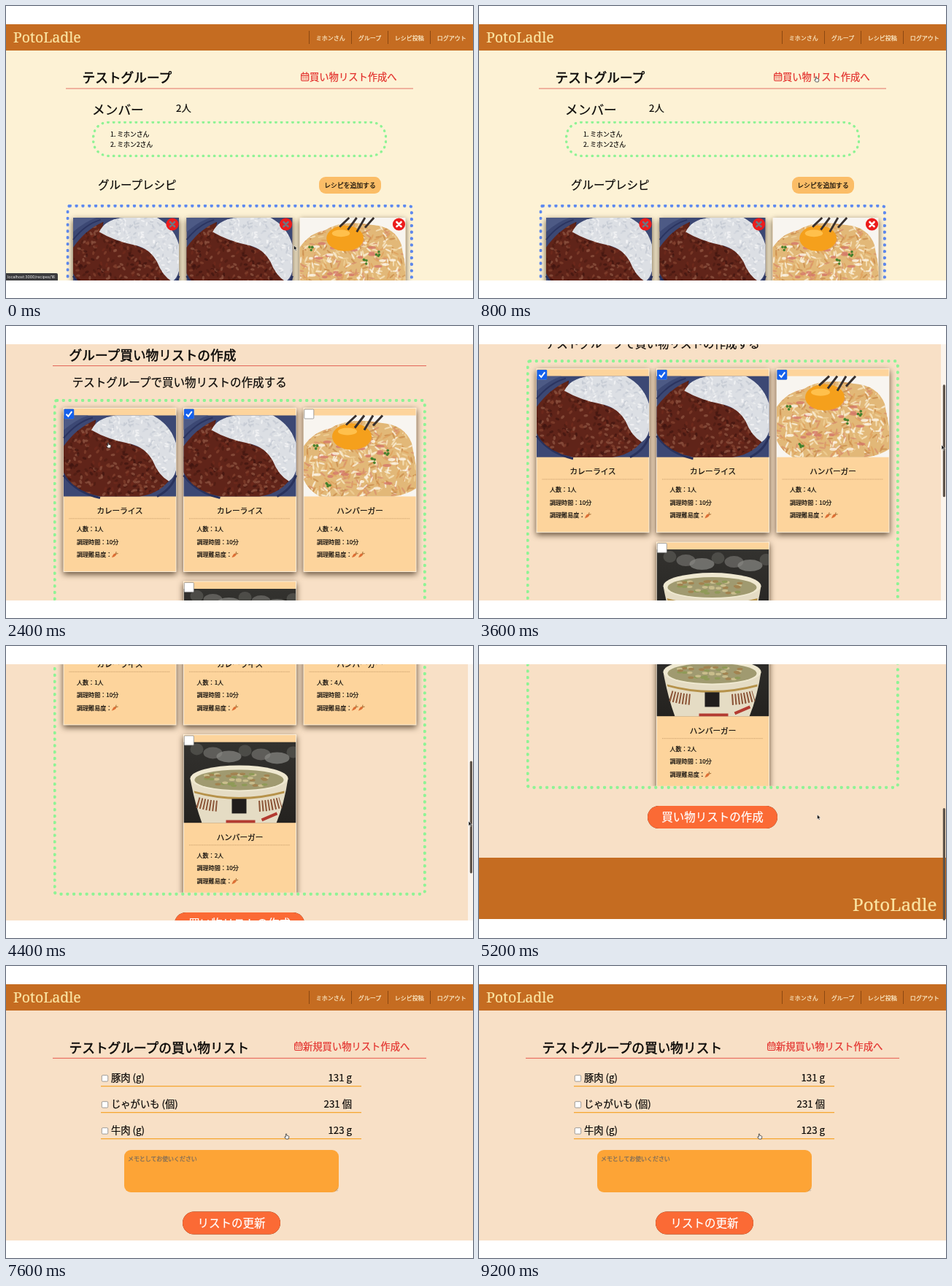
Recreate the animation shown at these times as an HTML page. Size 640 by 400 pixels, loop 9.6 s.

```html
<!DOCTYPE html>
<html lang="ja">
<head>
<meta charset="utf-8">
<title>買い物リスト</title>
<style>
  html, body { margin: 0; width: 100%; height: 100%; overflow: hidden; background: #fff; }
  svg { display: block; font-family: "Noto Sans CJK JP", "Noto Sans CJK", sans-serif; color: #0c0a08; }
  text { fill: currentColor; stroke: currentColor; stroke-width: .22px; }
  .bold { stroke-width: .55px; }
  .logo { font-family: "Noto Serif", serif; }
  .url { font-family: Inter, sans-serif; stroke: none; }
  .dots { box-sizing: border-box; width: 100%; height: 100%; border-style: dotted; }
  .shadow { filter: drop-shadow(0 3.5px 4.5px #3c2814d0); }
  .press { filter: drop-shadow(.8px .9px .3px #40200f); }
</style>
</head>
<body>
<svg id="stage" width="640" height="400" viewBox="0 0 640 400"></svg>
<script>
const CREAM = '#fbe4a2', BROWN = '#c56c21', RED = '#e3312d', GREEN = '#8ff395', PEACH = '#f8e0c6';
const BRAND = 'PotoLadle', USER = 'ミホン';

let seed = 7;
const rnd = () => (seed = (seed * 16807) % 2147483647) / 2147483647;
const times = (n, make) => Array.from({ length: n }, (_, i) => make(i)).join('');

// Text is placed by its vertical centre.
const text = (x, cy, size, str, extra = '') =>
  `<text x="${x}" y="${cy + size * 0.38}" font-size="${size}" ${extra}>${str}</text>`;
const rect = (x, y, w, h, fill, extra = '') =>
  `<rect x="${x}" y="${y}" width="${w}" height="${h}" fill="${fill}" ${extra}/>`;
const path = (d, fill, extra = '') => `<path d="${d}" fill="${fill}" ${extra}/>`;
const line = (d, stroke, width, extra = '') =>
  `<path d="${d}" fill="none" stroke="${stroke}" stroke-width="${width}" ${extra}/>`;

// The page is shown at 55 %; border and radius are in page pixels.
const ZOOM = 0.55;
const dotted = (x, y, w, h, radius, color, border) =>
  `<foreignObject transform="translate(${x} ${y}) scale(${ZOOM})" width="${w / ZOOM}" height="${h / ZOOM}">
    <div class="dots" style="border-width:${border}px;border-color:${color};border-radius:${radius}px"></div>
  </foreignObject>`;
const logo = (x, cy, size) => text(x, cy, size, BRAND, `class="logo" color="${CREAM}"`);
const photo = (name, x, y, w, h) =>
  `<use href="#${name}" transform="translate(${x} ${y}) scale(${w / 154} ${h / 111})"/>`;

// A shape filled with small random flecks.
function textured(id, d, fill, colors, n, rx, ry) {
  const flecks = times(n, () => {
    const x = rnd() * 154, y = rnd() * 111, turn = rnd() * 180;
    const color = colors[Math.floor(rnd() * colors.length)];
    return `<ellipse rx="${rx}" ry="${ry}" fill="${color}" opacity=".75"
      transform="translate(${x.toFixed(1)} ${y.toFixed(1)}) rotate(${turn.toFixed()})"/>`;
  });
  return `<clipPath id="${id}"><path d="${d}"/></clipPath>${path(d, fill)}<g clip-path="url(#${id})">${flecks}</g>`;
}

const curry = rect(0, 0, 154, 111, '#3c4874') +
  path('M0 20Q18 5 34 0H0Z', '#4d5a85') +
  line('M0 31Q18 9 40 3', '#2b3460', 2) +
  line('M0 82Q18 106 50 113M154 82Q148 101 128 111', '#29325d', 3) +
  textured('sauce', 'M0 42Q18 17 44 6L42 20L120 50L144 90Q128 108 104 111H50Q12 103 0 78Z',
    '#602419', ['#421610', '#82402e', '#4f1c13', '#6f2a1d', '#8d5340'], 420, 3, 1.7) +
  textured('rice', 'M38 20Q46 3 72 0H122Q146 12 154 38V75Q151 86 144 90Q130 82 122 62Q112 44 92 39Q60 33 38 20Z',
    '#dcdfe4', ['#f6f6f7', '#c3c8d2', '#eeeff1', '#d0d4dc'], 480, 3, 1.2);

const pasta = rect(0, 0, 154, 111, '#f8f5f0') +
  textured('noodles', 'M0 42Q14 22 36 18Q62 2 104 10Q138 12 148 38L154 70V100Q142 108 124 111H22Q6 102 0 88Z',
    '#e2b878', ['#f8e8c4', '#c98b4b', '#fdf6e6', '#dfa05c', '#f1d29a', '#d98f6c'], 460, 4.5, 1.2) +
  times(32, i => `<ellipse cx="${(10 + rnd() * 130).toFixed(1)}" cy="${(35 + rnd() * 68).toFixed(1)}"
    rx="${3 + i % 4}" ry="2" fill="${i % 2 ? '#d5786a' : '#fdf5e8'}" opacity=".8"/>`) +
  times(16, i => `<circle cx="${[12, 92, 110, 30][i % 4] + rnd() * 7}" cy="${[41, 58, 47, 93][i % 4] + rnd() * 7}"
    r="1.8" fill="#45812d"/>`) +
  '<ellipse cx="66" cy="29" rx="27" ry="18" fill="#f5a01c"/><ellipse cx="60" cy="22" rx="13" ry="5" fill="#ffc04c"/>' +
  line('M72 0L58 13M83 0L70 17M95 0L83 20M108 0L95 14', '#37302e', 3);

const cup = rect(0, 0, 154, 111, 'url(#dusk)') +
  times(7, i => `<ellipse cx="${18 + i * 22}" cy="${10 + i * 5 % 13}" rx="${9 + i % 3 * 4}" ry="8"
    fill="#8b8a86" opacity="${.3 + i % 3 * .2}"/>`) +
  path('M9 50Q15 84 25 111H127Q138 84 143 50Z', '#e5dcc4') +
  '<ellipse cx="76" cy="50" rx="67" ry="18" fill="#efe8d0"/><ellipse cx="76" cy="52" rx="61" ry="14" fill="#a09a70"/>' +
  times(40, i => `<ellipse cx="${76 + (rnd() - .5) * 90}" cy="${52 + (rnd() - .5) * 17}" rx="4" ry="1.8"
    fill="${['#c9bd8c', '#8f9a58', '#a28350'][i % 3]}"/>`) +
  path('M14 67Q76 84 138 67V70Q76 87 15 70Z', '#b6924a') +
  line('M19 83Q33 87 47 88M103 88Q120 87 133 83', '#8c5538', 15, 'stroke-dasharray="2 2.2"') +
  line('M58 109H98M107 107L128 98', '#b33b31', 4) + rect(66, 78, 20, 20, '#211d1c');

const calendar = (x, y) => `<g transform="translate(${x} ${y})">
  <rect x=".7" y="2" width="10" height="10" rx="1.4" fill="none" stroke="${RED}" stroke-width="1.2"/>
  ${line('M.7 4.6H10.7M3.4 0V3M8 0V3', RED, 1.3)}
  ${line('M2.6 7H9M2.6 9.6H9', RED, 1.3, 'stroke-dasharray="1.4 1.1"')}</g>`;
const carrot = (x, y) => `<g transform="translate(${x} ${y})">
  ${path('M0 9.5Q1.6 4 4.4 3.6Q6.6 4 6 6Q4.4 8.4 0 9.5Z', '#dd6f35')}
  ${line('M5.6 4.4L6 1.4M5.6 4.4L8.6 3.8', '#a0672e', 1)}</g>`;
const header = () => rect(0, 25, 640, 36, BROWN) + logo(10, 43, 19.5) +
  [[415.5, USER + 'さん'], [473.5, 'グループ'], [523.5, 'レシピ投稿'], [581.5, 'ログアウト']]
    .map(([x, label]) => rect(x - .5, 34, 1, 18, '#8c4812') + text(x + 9.3, 43.5, 8, label, 'color="#fdeecb"')).join('');
const heading = (x, cy, str) => text(x, cy, 17.7, str, 'class="bold"');
const button = (x, y, w, h, label) => rect(x, y, w, h, '#fb6a35', `rx="${h / 2}" class="press"`) +
  text(x + w / 2, y + h / 2, 15.5, label, 'color="#fff" text-anchor="middle"');

const groupCard = (x, name, cross) => rect(x, 290, 145, 120, '#fdd49c', 'class="shadow"') +
  photo(name, x, 290, 145, 108) + `<circle cx="${x + 136}" cy="299" r="8.6" fill="#ec1c1c"/>` +
  line(`M${x + 133} 296l6 6m0-6l-6 6`, cross, 2.6, 'stroke-linecap="round"');

const groupPage = rect(0, 25, 640, 351, '#fdf2d5') + header() +
  heading(104.5, 98, 'テストグループ') + calendar(404, 90.5) +
  text(416, 97, 13.3, '買い物リスト作成へ', `color="${RED}"`) + rect(82, 112.6, 476, .9, '#e0645a') +
  text(118, 142, 17.7, 'メンバー') + text(233, 140, 13.3, '2人') +
  dotted(118, 157.5, 404.5, 49.5, 40, GREEN, 7) +
  text(143, 175.5, 8.8, `1. ${USER}さん`) + text(143, 190, 8.8, `2. ${USER}2さん`) +
  text(126, 245, 15.5, 'グループレシピ') + rect(429, 234, 85, 23, '#fbbd67', 'rx="9"') +
  text(471.5, 245.7, 8.8, 'レシピを追加する', 'text-anchor="middle"') +
  dotted(82.3, 271.5, 476, 220, 10, '#5f8aef', 8) +
  groupCard(92, 'curry', '#6f7680') + groupCard(247.5, 'curry', '#6f7680') + groupCard(402.5, 'pasta', '#fff');

function recipeCard([x, y, name, title, people, carrots], i) {
  const row = (dy, str) => text(x + 18, y + dy, 8.05, str);
  return rect(x, y, 154, 224, '#fdd49c', 'class="shadow" stroke="#fff3e0" stroke-width=".9"') +
    photo(name, x, y + 10, 154, 111) +
    text(x + 77, y + 140.7, 10.6, title, 'text-anchor="middle"') +
    line(`M${x + 7.5} ${y + 151.3}h138`, '#b58a5b', .7, 'stroke-dasharray="1 .8"') +
    row(165.5, `人数：${people}人`) + row(183, '調理時間：10分') + row(200.7, '調理難易度：') +
    times(carrots, k => carrot(x + 66 + k * 9, y + 195.3)) +
    rect(x + .8, y + 1.5, 13, 13, '#fff', 'rx="1" stroke="#8b8b8b" stroke-width=".8"') +
    `<g id="tick${i}">${rect(x + .5, y + 1.2, 13.6, 13.6, '#1560ec', 'rx="1"')}
      ${line(`M${x + 3.5} ${y + 8.2}l2.8 3l5-6.6`, '#fff', 2)}</g>`;
}

const recipes = [
  [79, 184, 'curry', 'カレーライス', 1, 1],
  [243.5, 184, 'curry', 'カレーライス', 1, 1],
  [408, 184, 'pasta', 'ハンバーガー', 4, 2],
  [243.5, 421.4, 'cup', 'ハンバーガー', 2, 1]
];
const pickPage = rect(0, 25, 640, 795, PEACH) + header() +
  heading(86.5, 112, 'グループ買い物リストの作成') + rect(64, 125.6, 512, .9, '#e2574c') +
  text(90.8, 149, 15.52, 'テストグループで買い物リストの作成する') +
  `<g clip-path="url(#box)">${recipes.map(recipeCard).join('')}</g>` +
  dotted(64.5, 171.2, 511.3, 471, 10, GREEN, 8) +
  button(231, 665, 178, 31, '買い物リストの作成') +
  rect(0, 736, 640, 84, BROWN) + logo(512, 800, 24.3);

const items = [['豚肉 (g)', '131 g'], ['じゃがいも (個)', '231 個'], ['牛肉 (g)', '123 g']];
const listPage = rect(0, 25, 640, 351, PEACH) + header() +
  heading(86.5, 112, 'テストグループの買い物リスト') + calendar(395, 103.5) +
  text(407, 109.5, 13.3, '新規買い物リスト作成へ', `color="${RED}"`) + rect(64, 125.8, 512, .9, '#e4483f') +
  items.map(([name, amount], i) => {
    const y = 153 + i * 36;
    return rect(131.3, y - 3.3, 8.4, 8.4, '#fff', 'rx="1.3" stroke="#777" stroke-width=".7"') +
      text(144, y, 13.3, name) + text(474, y, 13.3, amount, 'text-anchor="end"') +
      rect(130, y + 11, 357, 1.3, '#f6a733');
  }).join('') +
  rect(162, 252, 294, 58, '#fda436', 'rx="9"') +
  text(167, 264, 7.95, 'メモとしてお使いください', 'color="#75695c"') +
  line('M451 308.5l4-4m-1.6 4l1.6-1.6', '#8c8c8c', .6) +
  button(242, 336.5, 134, 31, 'リストの更新');

const cursors = {
  arrow: path('M0 0V6.4L1.5 5L2.5 7.3L3.6 6.8L2.6 4.6H4.6Z', '#111', 'stroke="#fff" stroke-width=".5"'),
  hand: path('M-.6 0Q.2-.6.7.2V2.2L3.4 3Q4 3.4 3.7 5L3 7H-.4L-2.4 4.2Q-2.2 3.3-.6 4.3Z', '#fff',
    'stroke="#222" stroke-width=".7"'),
  beam: line('M-1.4-3H1.4M0-3V3M-1.4 3H1.4', '#333', .7)
};

stage.innerHTML = `<defs>
  <linearGradient id="dusk" x2="0" y2="1"><stop stop-color="#33322f"/><stop offset="1" stop-color="#24221f"/></linearGradient>
  <clipPath id="box"><rect x="69" y="175.6" width="502.3" height="462.2"/></clipPath>
  <g id="curry">${curry}</g><g id="pasta">${pasta}</g>
  <clipPath id="frame"><rect width="154" height="111"/></clipPath><g id="cup" clip-path="url(#frame)">${cup}</g></defs>
  <g id="page0">${groupPage}</g><g id="page1">${pickPage}</g><g id="page2">${listPage}</g>
  <g id="status">${rect(-2, 366, 73, 12, '#3b3b3d', 'rx="2"')}
    ${text(2, 371.2, 5.3, 'localhost:3000/recipes/16', 'class="url" color="#eee"')}</g>
  <g id="track">${rect(633, 25, 7, 351, '#fbf4ec')}</g>
  <rect id="thumb" x="635.8" width="3.2" height="154" rx="1.6" fill="#5d5248"/>
  ${rect(0, 0, 640, 25, '#fff')}${rect(0, 376, 640, 24, '#fff')}
  ${Object.keys(cursors).map(k => `<g id="${k}">${cursors[k]}</g>`).join('')}`;

// page, scroll, cursor, x, y for each 400 ms step; the last one holds.
const steps = [
  [0, 0, 'arrow', 394.5, 328], [0, 0, 'arrow', 430, 215], [0, 0, 'hand', 462, 97],
  [1, 0, 'arrow', 462, 97], [1, 43, 'beam', 351.5, 138], [1, 71.5, 'hand', 318, 160],
  [1, 71.5, 'hand', 140, 160], [1, 71.5, 'hand', 470, 160], [1, 71.5, 'arrow', 582, 162],
  [1, 125.3, 'arrow', 634, 163], [1, 215, 'arrow', 634, 203], [1, 300, 'arrow', 634, 240],
  [1, 300, 'hand', 322, 190], [1, 446, 'arrow', 463.5, 231], [1, 444, 'arrow', 425, 232],
  [1, 444, 'hand', 384, 232], [2, 0, 'hand', 384, 232], [2, 0, 'hand', 384, 230]
];
const tickedAt = [6, 5, 7, 12];
const $ = id => document.getElementById(id);
const show = (id, on) => $(id).setAttribute('visibility', on ? 'visible' : 'hidden');
const move = (id, x, y) => $(id).setAttribute('transform', `translate(${x} ${y})`);

function draw() {
  const n = Math.floor(performance.now() / 400) % 24;
  const [page, scroll, cursor, x, y] = steps[Math.min(n, steps.length - 1)];
  for (let i = 0; i < 3; i++) $('page' + i).style.display = i === page ? '' : 'none';
  move('page1', 0, -scroll);
  tickedAt.forEach((at, i) => $('tick' + i).style.display = n >= at ? '' : 'none');
  show('status', n < 2);
  show('track', n >= 9 && n <= 12);
  show('thumb', n === 4 || n === 5 || (n >= 9 && n <= 14));
  move('thumb', 0, 25 + scroll * 351 / 795);
  for (const k in cursors) show(k, k === cursor);
  move(cursor, x, y);
  requestAnimationFrame(draw);
}
draw();
</script>
</body>
</html>
```
